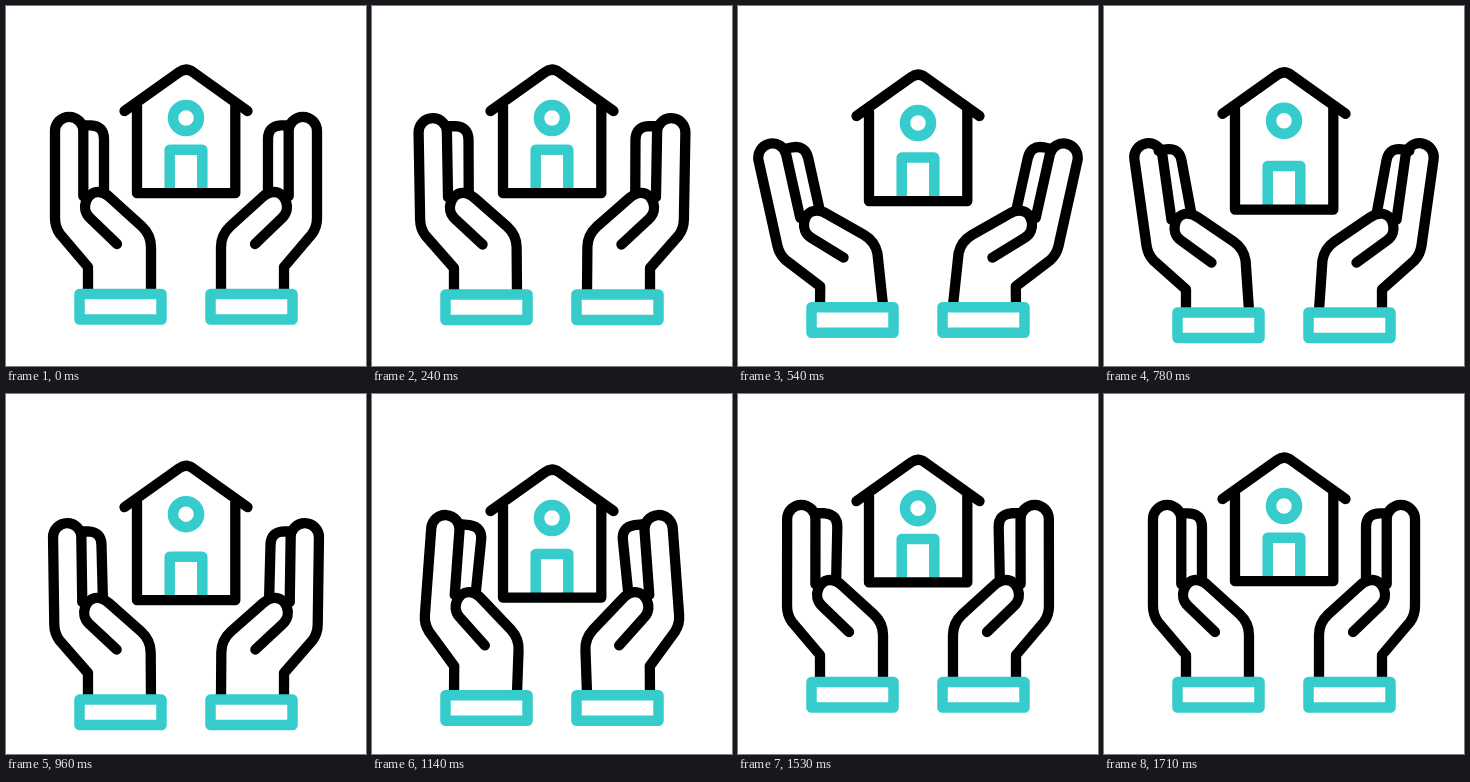
An HTML page that plays this animation: 360 by 360 pixels, repeating every 1.74 s.

```html
<!DOCTYPE html>
<html lang="en">
<head>
<meta charset="utf-8">
<title>Hands holding a house</title>
<style>
  html, body { margin: 0; width: 100%; height: 100%; overflow: hidden; background: #fff; }
  svg { display: block; width: 100vw; height: 100vh; }
  svg * { fill: none; stroke-linecap: round; stroke-linejoin: round; }
  .ink { stroke: #000; stroke-width: 10.3; }
  .teal { stroke: #36cccc; stroke-width: 10.5; }
  #door { stroke-linecap: butt; }
</style>
</head>
<body>
<svg viewBox="0 0 360 360">
  <path id="door" class="teal" d="M163.7 185V143.7H196.3V185"/>
  <circle id="pane" class="teal" cx="180" cy="112" r="13"/>
  <path id="walls" class="ink"/>
  <path id="roof" class="ink" d="M118.5 105L173 66.2Q180 61 187 66.2L241.5 105"/>
  <g id="hand">
    <path id="finger" class="ink"/>
    <path id="palm" class="ink"/>
    <path id="thumb" class="ink"/>
    <rect class="teal" x="73.5" y="288" width="82" height="25.5"/>
  </g>
  <use href="#hand" transform="translate(360 0) scale(-1 1)"/>
</svg>
<script>
const LOOP = 1740, STEP = 30, HOUSE_LAG = 120;
const el = id => document.getElementById(id);

// Smooth curve through [time, value] keys, flat at every extreme.
function curve(keys) {
  const slope = i => (keys[i + 1][1] - keys[i][1]) / (keys[i + 1][0] - keys[i][0]);
  const tangents = keys.map((_, i) => {
    if (i === 0 || i === keys.length - 1) return 0;
    const a = slope(i - 1), b = slope(i);
    return a * b > 0 ? 2 * a * b / (a + b) : 0;
  });
  return t => {
    let i = 0;
    while (i < keys.length - 2 && t >= keys[i + 1][0]) i++;
    const [t0, v0] = keys[i], [t1, v1] = keys[i + 1];
    const w = t1 - t0, u = (t - t0) / w, q = 1 - u;
    return v0 * (1 + 2 * u) * q * q + v1 * u * u * (3 - 2 * u)
      + w * u * q * (tangents[i] * q - tangents[i + 1] * u);
  };
}

const drop = curve([[0, 0], [180, 0], [240, .5], [300, 2.5], [540, 13.2], [600, 15],
  [780, 18.5], [840, 19], [900, 18.5], [1080, 15], [1140, 13.2], [1380, 2.5], [1440, .5], [1560, 0], [LOOP, 0]]);
const roofDrop = curve([[0, 0], [240, 0], [540, 5], [780, 2.8], [1110, 12.2], [1140, 12], [1380, 6], [1680, 0], [LOOP, 0]]);
const tilt = curve([[0, 0], [120, 0], [240, 1], [540, 12.5], [780, 8], [1140, -4.2], [1380, -.8], [1620, .1], [LOOP, 0]]);
const fingerTilt = curve([[0, 0], [240, -.8], [540, 0], [780, 2.5], [1140, -1.6], [1380, -2.4], [1680, 0], [LOOP, 0]]);

// Rotates every "x,y" pair of a path, leaning to the left for positive angles.
function turn(path, degrees, cx, cy) {
  const a = degrees * Math.PI / 180, c = Math.cos(a), s = Math.sin(a);
  return path.replace(/(-?[\d.]+),(-?[\d.]+)/g, (_, px, py) => {
    const x = px - cx, y = py - cy;
    return (cx + x * c + y * s).toFixed(2) + ',' + (cy - x * s + y * c).toFixed(2);
  });
}

const PALM = 'L82,261 L54,228 Q49,221 49,212 L49,125 A14 14 0 0 1 77.3,125 L77.3,190';
const FINGER = 'M77.3,119.3 L85,119.3 Q98,120 98,133 L98,187';
const THUMB = 'M111,238 L83.5,211.5 C74,202 81,186 92,186 Q98,186 104,191.5 L136,220.5 Q145,229 145,241';

const shift = (id, y) => el(id).setAttribute('transform', `translate(0 ${y.toFixed(2)})`);
const shape = (id, d) => el(id).setAttribute('d', d);

function draw(t) {
  const top = roofDrop(t), bottom = drop(Math.max(0, t - HOUSE_LAG));
  shift('roof', top);
  shift('pane', top);
  shift('door', bottom);
  shape('walls', `M131 ${100 + top}V${187.2 + bottom}H229.3V${100 + top}`);

  const bend = path => turn(path, tilt(t), 110, 263);
  shift('hand', drop(t));
  shape('palm', 'M82 286 ' + bend(PALM));
  shape('thumb', bend(THUMB) + ' L145 286');
  shape('finger', bend(turn(FINGER, fingerTilt(t), 88, 190)));
}

function tick() {
  let t = Math.floor(performance.now() % LOOP / STEP) * STEP;
  // Three poses last two steps.
  if (t === 570 || t === 1110 || t === 1650) t -= STEP;
  draw(t);
  requestAnimationFrame(tick);
}
tick();
</script>
</body>
</html>
```
